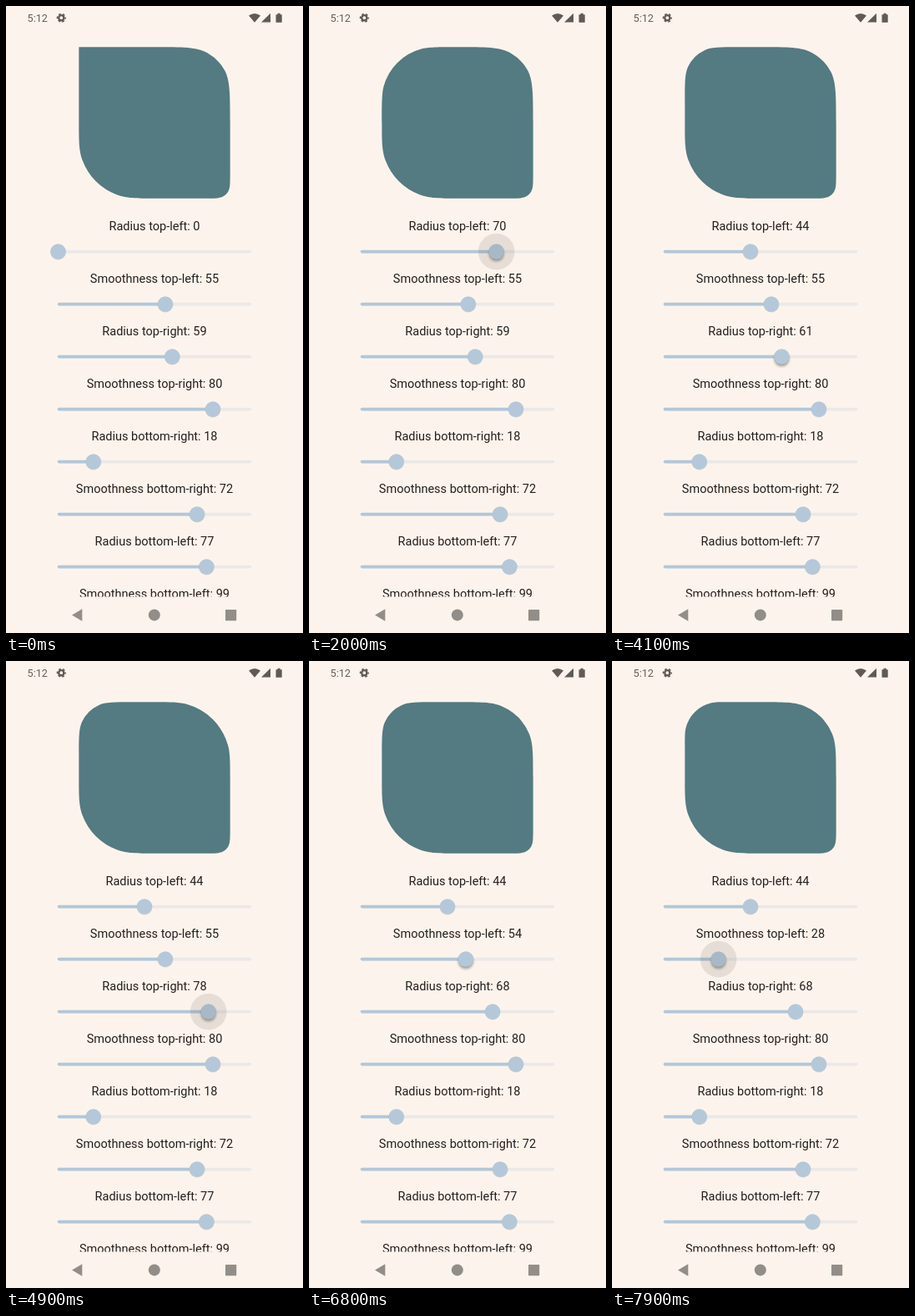
These frames come from a looping animation (356x752 px, 8 s). An HTML page:

```html
<!DOCTYPE html>
<html lang="en">
<head>
<meta charset="utf-8">
<title>Smooth corners</title>
<style>
  html, body { margin: 0; width: 100%; height: 100%; overflow: hidden; background: #fcf4ec; }
  svg { display: block; width: 356px; height: 752px; }
  text { font: 14.5px Roboto, "Liberation Sans", sans-serif; fill: #241e1d; text-anchor: middle; }
  .clock { font-size: 12.7px; fill: #625d59; text-anchor: start; }
  .status { fill: #5f5a56; }
  .nav { fill: #928d88; }
  .track { stroke: #ebe8e8; stroke-width: 3.6; stroke-linecap: round; }
  .active { stroke: #b2c7d9; }
  .thumb { fill: #b5c8d9; }
  .halo { fill: #4a4038; }
</style>
</head>
<body>
<svg viewBox="0 0 356 752">
  <defs>
    <filter id="blur" x="-50%" y="-50%" width="200%" height="200%"><feGaussianBlur stdDeviation="1.8"/></filter>
    <clipPath id="content"><rect width="356" height="708.5"/></clipPath>
  </defs>

  <text class="clock" x="25.5" y="19">5:12</text>
  <g class="status">
    <g fill="none" stroke="#5f5a56">
      <circle cx="66.3" cy="14.2" r="3.1" stroke-width="2.4"/>
      <circle cx="66.3" cy="14.2" r="4.8" stroke-width="1.6" stroke-dasharray="2.7 2.327" stroke-dashoffset="1.35"/>
    </g>
    <path d="M291 11.6Q298 6.4 305 11.6L298 19.8Z"/>
    <path d="M317 8.8V19.6H306Z"/>
    <path d="M323.5 10.2H325.5V8.8H328.7V10.2H330.7V19.8H323.5Z"/>
  </g>

  <path id="shape" fill="#547a82"/>
  <g id="rows" clip-path="url(#content)"></g>

  <g class="nav">
    <path d="M79 730.5L91.3 723.2V737.8Z"/>
    <circle cx="177.8" cy="730.4" r="7"/>
    <rect x="263" y="724" width="13.2" height="13.2" rx=".6"/>
  </g>
</svg>
<script>
const LOOP = 8000, STEP = 100;
const DP = 356 / 392.7, HALF = 100 * DP;
const CENTER = { x: 178, y: 140 };
const LEFT = 62.5, SPAN = 231;

// Keys are [ms, value]; press is the span during which a finger is down.
const sliders = [
  { label: "Radius top-left", press: [1200, 3100],
    keys: [[1200, 0], [1300, 6], [1500, 18], [2000, 70.2], [2200, 86.2], [2500, 8],
           [2800, 63], [2900, 59.3], [3100, 44.8]] },
  { label: "Smoothness top-left", press: [6800, 9000],
    keys: [[6700, 55.6], [6800, 54.3], [7200, 14], [7600, 90.5], [7900, 28.2]] },
  { label: "Radius top-right", press: [4100, 6000],
    keys: [[4000, 59.2], [4100, 61], [4300, 80.6], [4600, 2], [4900, 78], [5000, 85],
           [5400, 34], [5800, 64], [6000, 68.2]] },
  { label: "Smoothness top-right", keys: [[0, 80.3]] },
  { label: "Radius bottom-right", keys: [[0, 18.3]] },
  { label: "Smoothness bottom-right", keys: [[0, 72.1]] },
  { label: "Radius bottom-left", keys: [[0, 77]] },
  { label: "Smoothness bottom-left", keys: [[0, 99.5]] }
];

const clamp = v => Math.max(0, Math.min(1, v));

function add(parent, tag, attrs) {
  const el = document.createElementNS("http://www.w3.org/2000/svg", tag);
  set(el, attrs);
  return parent.appendChild(el);
}

function set(el, attrs) {
  for (const name in attrs) el.setAttribute(name, attrs[name]);
}

// Monotone cubic interpolation: flat at turning points, smooth in between.
function valueAt(keys, t) {
  const last = keys.length - 1;
  if (t <= keys[0][0]) return keys[0][1];
  if (t >= keys[last][0]) return keys[last][1];
  const i = keys.findIndex(k => k[0] > t) - 1;
  const slope = j => j < 0 || j >= last ? 0
    : (keys[j + 1][1] - keys[j][1]) / (keys[j + 1][0] - keys[j][0]);
  const tangent = j => {
    const a = slope(j - 1), b = slope(j);
    return a * b <= 0 ? 0 : 2 * a * b / (a + b);
  };
  const [t0, v0] = keys[i], [t1, v1] = keys[i + 1];
  const d = t1 - t0, u = (t - t0) / d, w = 1 - u;
  return v0 * (1 + 2 * u) * w * w + v1 * u * u * (3 - 2 * u)
    + d * u * w * (tangent(i) * w - tangent(i + 1) * u);
}

// One smoothed corner, turned clockwise by `turns` quarters from the top left.
function corner(radius, smooth, turns) {
  const r = radius * DP;
  const s = smooth / 100 * (1 - Math.max(0, 2 * r / HALF - 1));
  const p = Math.min((1 + smooth / 100) * r, HALF);
  const alpha = Math.PI / 4 * s;
  const arc = Math.sin(Math.PI / 4 * (1 - s)) * r * Math.SQRT2;
  const c = r * Math.tan(alpha / 2) * Math.cos(alpha);
  const d = c * Math.tan(alpha);
  const b = (p - arc - c - d) / 3;
  const at = (x, y) => {
    x -= HALF;
    y -= HALF;
    for (let i = 0; i < turns; i++) [x, y] = [-y, x];
    return `${(CENTER.x + x).toFixed(2)} ${(CENTER.y + y).toFixed(2)} `;
  };
  const e = p - 3 * b - c;
  return (turns ? "L" : "M") + at(0, p)
    + "C" + at(0, p - 2 * b) + at(0, p - 3 * b) + at(d, e)
    + `A${r} ${r} 0 0 1 ` + at(e, d)
    + "C" + at(p - 3 * b, 0) + at(p - 2 * b, 0) + at(p, 0);
}

const rows = document.getElementById("rows");
const shape = document.getElementById("shape");

sliders.forEach((s, i) => {
  const g = add(rows, "g", { transform: `translate(0 ${63 * i})` });
  const y = 294.6, line = { x1: 63.5, x2: 292.5, y1: y, y2: y };
  s.text = add(g, "text", { x: 178, y: 269.2 });
  add(g, "line", { ...line, class: "track" });
  s.active = add(g, "line", { ...line, class: "track active" });
  add(g, "circle", { cy: y + .6, r: 9.3, opacity: .13 }).classList.add("rim");
  s.rim = g.lastChild;
  s.shadow = add(g, "circle", { cy: y + 2.8, r: 9.2, filter: "url(#blur)" });
  s.thumb = add(g, "circle", { cy: y, r: 9.3, class: "thumb" });
  s.halo = add(g, "circle", { cy: y, class: "halo" });
});

function draw(t) {
  const values = sliders.map(s => {
    const v = valueAt(s.keys, t), x = LEFT + SPAN * v / 100;
    const [down, up] = s.press || [LOOP, LOOP];
    const grow = clamp((t - down) / 200), fade = 1 - clamp((t - up) / 200);
    s.text.textContent = `${s.label}: ${Math.floor(v)}`;
    set(s.active, { x2: Math.max(x, 63.5) });
    for (const el of [s.rim, s.shadow, s.thumb, s.halo]) set(el, { cx: x });
    set(s.shadow, { opacity: t >= down ? .3 * fade : 0 });
    set(s.halo, { r: 21.8 * (.4 + .6 * grow), opacity: grow > 0 ? .12 * fade : 0 });
    return v;
  });
  let d = "";
  for (let k = 0; k < 4; k++) d += corner(values[2 * k], values[2 * k + 1], k);
  shape.setAttribute("d", d + "Z");
}

const start = performance.now();
function tick() {
  const t = (performance.now() - start) % LOOP;
  draw(Math.floor(t / STEP) * STEP);
  requestAnimationFrame(tick);
}
tick();
</script>
</body>
</html>
```
